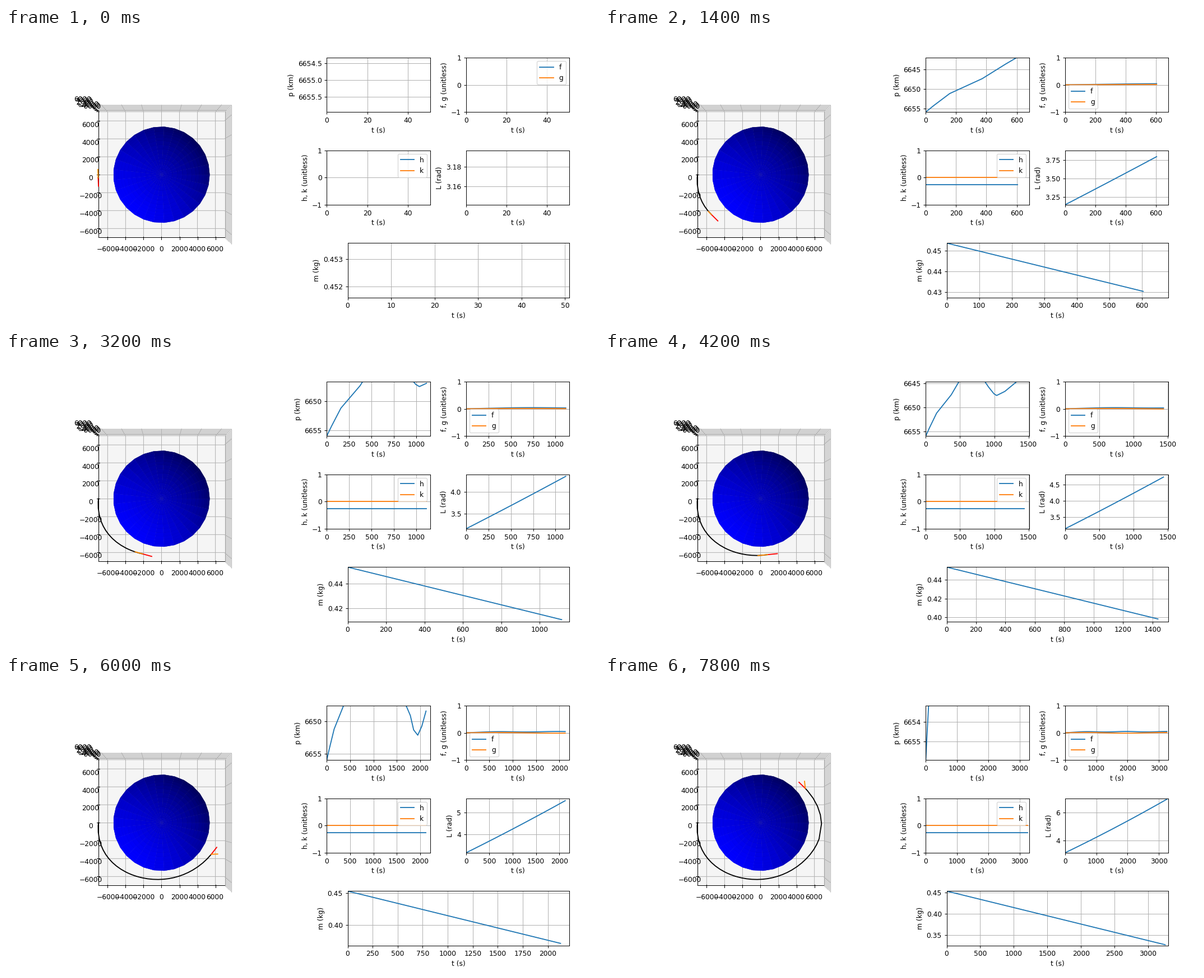
Animation, 1058 px wide and 529 px high, one loop 8000 ms. Source, as a matplotlib script:

```python
import numpy as np
import matplotlib.pyplot as plt
from matplotlib.animation import FuncAnimation

W, H = 1058, 529
FRAMES, STEP_MS = 40, 200
ARROW = 1000


def curve(x, *knots):
    """Straight lines through a few (x, y) points."""
    return np.interp(x, *zip(*knots))


# Flight state at every integrator step
n = np.arange(FRAMES + 1)
t = curve(n, (0, 0), (1, 51), (4, 372), (11, 914), (17, 1154), (27, 1862),
          (34, 2480), (35, 2713), (39, 3254), (40, 3301))
p = 6640 + curve(t, (0, 15.95), (140, 11.5), (372, 7.35), (600, 1.8), (740, 2),
                 (914, 5.7), (1020, 7.6), (1154, 6.65), (1430, 3.4), (1785, 8.9),
                 (1897, 12.4), (1993, 11.9), (2150, 7.8), (2480, 6.6),
                 (2713, 4.5), (3301, 13.17))
f = (1 - np.exp(-t / 350)) * (.041 + .009 * np.cos(2 * np.pi * (t - 630) / 1330))
g = .013 * np.sin(2 * np.pi * t / 2600)
h = np.full_like(t, -0.25)
k = np.zeros_like(t)
L = np.pi + 1.07e-3 * t + 3e-8 * t ** 2
m = .45358 - 3.86e-5 * t

# Orbit in space: node on -x, tilted about the x axis
inc = 2 * np.arctan(0.25)
u = L - np.pi
r = p / (1 + f * np.cos(L) + g * np.sin(L))
radial = np.array([-np.cos(u), -np.sin(u) * np.cos(inc), np.sin(u) * np.sin(inc)])
along = np.array([np.sin(u), -np.cos(u) * np.cos(inc), np.cos(u) * np.sin(inc)])
pos = r * radial

# Thrust direction: braking first, then speeding up and pushing outward
push = curve(n, (0, -1), (4, -.84), (10, -.12), (18, -1), (24, -1),
             (26, .75), (34, .07), (39, .7))
lift = curve(n, (26, 0), (34, 1.05), (39, .53))

fig = plt.figure(figsize=(12, 6), dpi=W / 12)


def rect(x, y, w, hgt):
    """Pixel box measured from the top left, as figure fractions."""
    return [x / W, 1 - (y + hgt) / H, w / W, hgt / H]


# 3D view
ax3 = fig.add_axes(rect(73.1, 68.6, 398, 398), projection="3d")
lon = np.linspace(0, 2 * np.pi, 30)
lat = np.linspace(0, np.pi, 30)
R = 5085
ax3.plot_surface(R * np.outer(np.cos(lon), np.sin(lat)),
                 R * np.outer(np.sin(lon), np.sin(lat)),
                 R * np.outer(np.ones_like(lon), np.cos(lat)), color="blue")
track, = ax3.plot([], [], [], color="black")
heading, = ax3.plot([], [], [], color="red")
thrust, = ax3.plot([], [], [], color="darkorange")
ax3.set(xlim=(-7000, 7000), ylim=(-7000, 7000), zlim=(-7000, 7000))
ax3.set_box_aspect((1, 1, 1))
ax3.view_init(elev=90, azim=-90)

# Time histories
COL, ROW = (572.3, 820.7), (52.9, 218.7, 384.4)
PW, PH = 184.4, 97.3
plots = []


def history(box, ylabel, *series, names=None):
    ax = fig.add_axes(rect(*box))
    ax.set_xlabel("t (s)")
    ax.set_ylabel(ylabel)
    ax.grid(True)
    lines = [ax.plot([], [])[0] for _ in series]
    if names:
        ax.set_ylim(-1, 1)
        ax.legend(lines, names, loc="best")
    plots.append((ax, lines, series, names is None))


history((COL[0], ROW[0], PW, PH), "p (km)", p)
history((COL[1], ROW[0], PW, PH), "f, g (unitless)", f, g, names=("f", "g"))
history((COL[0], ROW[1], PW, PH), "h, k (unitless)", h, k, names=("h", "k"))
history((COL[1], ROW[1], PW, PH), "L (rad)", L)
history((609.5, ROW[2], 395.6, PH), "m (kg)", m)


def segment(line, start, vec):
    line.set_data_3d(*np.column_stack([start, start + ARROW * vec]))


def update(i):
    j = i + 1
    track.set_data_3d(*pos[:, :j + 1])
    segment(heading, pos[:, j], along[:, j])
    segment(thrust, pos[:, j], push[i] * along[:, j] + lift[i] * radial[:, j])
    for ax, lines, series, fit in plots:
        for line, y in zip(lines, series):
            line.set_data(t[:j], y[:j])
        ax.set_xlim(0, t[j])
        if fit:
            y = series[0]
            # mass falls with time, so its newest value is the lower limit
            ax.set_ylim(*((y[j], y[0]) if y is m else (y[0], y[j])))
    return []


anim = FuncAnimation(fig, update, frames=FRAMES, interval=STEP_MS,
                     repeat=True, repeat_delay=0, init_func=lambda: update(0))
plt.show()
```
